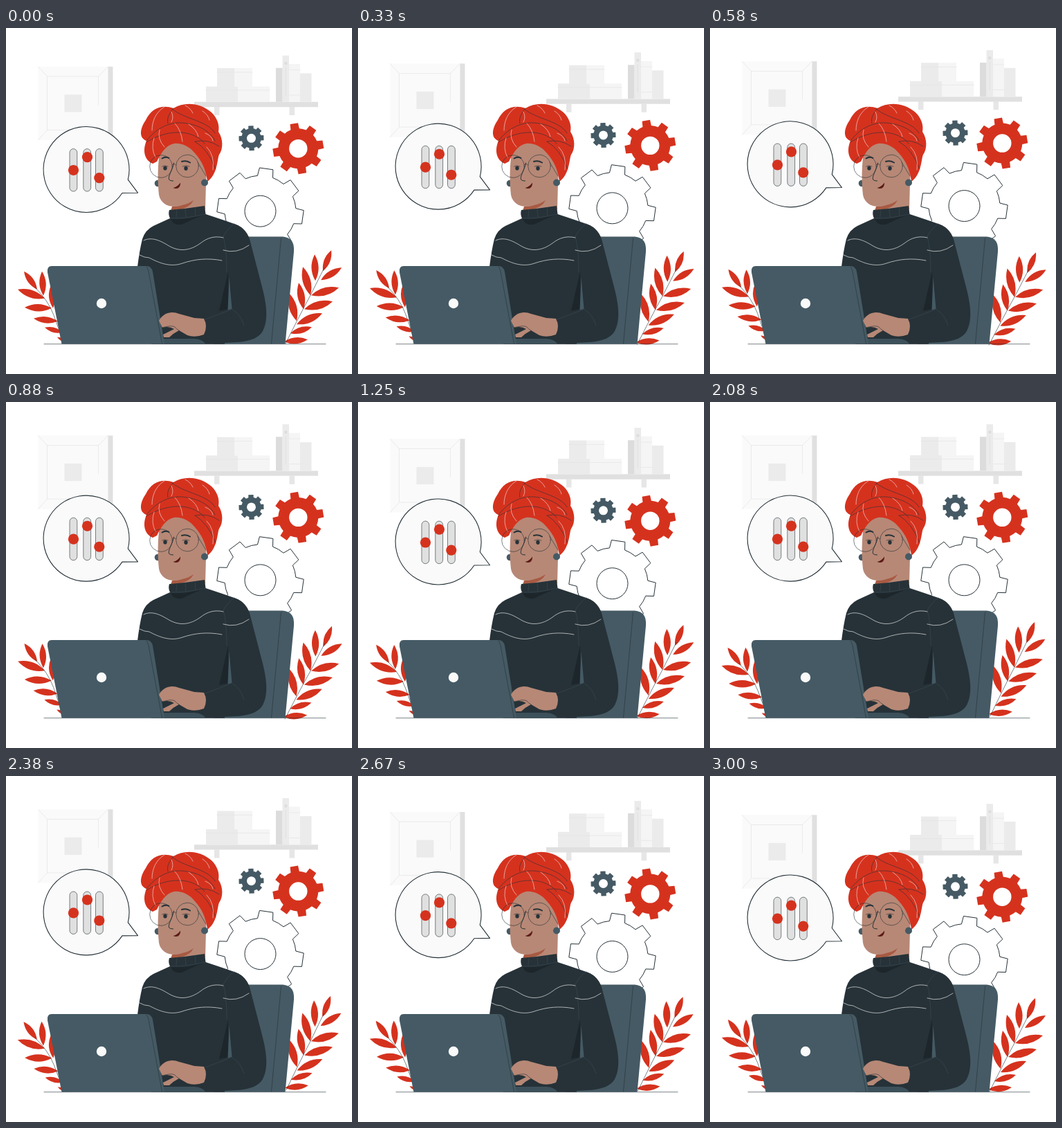
An HTML page that plays this animation: 500x500 px, repeating every 3.04 s.

```html
<!DOCTYPE html>
<html lang="en">
<head>
<meta charset="utf-8">
<title>Working with settings</title>
<style>
  html, body { margin: 0; width: 100%; height: 100%; overflow: hidden; background: #fff; }
  svg { display: block; width: 100%; height: 100%; }
  .line { fill: none; stroke-linecap: round; stroke-linejoin: round; }
  .dark { stroke: #263238; stroke-width: .6; }
  .pale { stroke: #f3e9e6; stroke-width: .6; }
  .faint { stroke: #e4e4e4; stroke-width: .7; }
</style>
</head>
<body>
<svg viewBox="0 0 500 500">
  <g id="floating">
    <!-- picture -->
    <path fill="#e0e0e0" d="M147 55.800h7.500v106.200h-7.500z"/>
    <path fill="#fafafa" d="M46.500 55.800h101v106.200h-101z"/>
    <path class="line faint" d="M46.500 55.800L59.500 70H133.500L147.500 55.800M133.500 70V111M59.500 70V147.500H133.500M59.500 147.500L46.500 162"/>
    <path fill="#ebebeb" d="M84.500 96.300h25v25.200h-25z"/>

    <!-- shelf -->
    <path fill="#e6e6e6" d="M301 114h7.500v12h-7.500zM409.500 114h7.500v12h-7.500z"/>
    <path fill="#e0e0e0" d="M272 106.800h179v7.400h-179z"/>
    <path fill="#ebebeb" d="M305 58h25v26.500h-25zM289 84.500h46v22.300h-46zM399.500 39.700h9.500v67h-9.500zM425 65.500h16.500v41.300h-16.500z"/>
    <path fill="#f5f5f5" d="M330 58h26v26.500h-26zM335 84.500h46v22.300h-46zM409 52h16v54.800h-16z"/>
    <path fill="#dcdcdc" d="M390 57.700h9.500v49h-9.500z"/>
    <path class="line faint" d="M305 64H356M289 90H381M409 60.500H425M409 97H425"/>
    <path class="line" stroke="#dcdcdc" stroke-width=".7" d="M404.300 57V97"/>
    <circle cx="404.300" cy="51" r="2.300" fill="#dedede"/>

    <g id="gears"></g>

    <!-- speech bubble -->
    <path fill="#fafafa" stroke="#263238" stroke-width="1.100" stroke-linejoin="round"
      d="M176.300 219.200L190.500 238.200L167.900 238.500A62 62 0 1 1 176.300 219.200Z"/>
    <g fill="#e0e0e0" stroke="#263238" stroke-width=".6">
      <rect x="92" y="174.600" width="10.800" height="61.500" rx="5.400"/>
      <rect x="111.800" y="174.600" width="10.800" height="61.500" rx="5.400"/>
      <rect x="129.500" y="174.600" width="10.800" height="61.500" rx="5.400"/>
    </g>
    <g fill="#d5321e">
      <circle cx="97.500" cy="205.500" r="7.600"/>
      <circle cx="117.500" cy="186.600" r="7.600"/>
      <circle cx="134.800" cy="216.600" r="7.600"/>
    </g>
  </g>

  <g id="plants">
    <g id="leaves" fill="#d5321e"></g>
    <path class="line dark" d="M404 456C416 432 428 408 440 386Q449 368 460 346M42 375Q61 394 69 415T82 454"/>
  </g>

  <path class="line dark" d="M55 456.700H462"/>

  <!-- chair -->
  <path fill="#455a64" d="M318 301.500H400Q417.500 303 416 323L403.500 456.700H300V330Z"/>
  <path class="line dark" d="M397.500 304L383.500 456"/>

  <!-- neck and face -->
  <circle cx="219.500" cy="224.500" r="4.800" fill="#455a64"/>
  <path fill="#b78876" d="M246 215L289.500 205L288 262Q262 276 238 264L246 253Z"/>
  <path fill="#a85a42" d="M240 258Q260 257 271 249Q266 259 252 262L238 264Z"/>
  <path fill="#b78876" d="M222 180C219 200 219 222 221 241C223 253 234 259 246 258C261 256 271 247 276 234L289 222L290 190L262 162H234Z"/>

  <!-- headscarf -->
  <path fill="#d5321e" d="M212 196C200 191 197 177 203 163C192 159 193 146 202 133C210 116 225 110 242 116C258 106 281 108 297 122C305 130 309 140 307 150C314 160 314 175 308 183C305 190 306 211 291 222C289 205 283 192 273 181C265 171 254 166 243 167C231 169 224 181 218 193Z"/>
  <path class="line dark" d="M203 163C216 146 234 136 254 137C278 139 295 149 302 163M240 117C258 132 292 134 302 152M203 165C224 152 246 148 265 153Q281 158 287 167M273 164Q292 160 308 171M273 164Q292 175 303 204M242 116C236 123 232 130 234 138"/>
  <path class="line pale" d="M229 114C217 121 211 134 211 148M239 121Q243 129 239 136M259 112Q267 116 270 123M284 120Q292 125 294 133M222 147Q218 160 229 172M244 138Q253 147 255 164M264 139Q276 147 278 157M214 159Q209 174 216 187M288 152Q298 156 299 163M290 172Q302 184 299 205"/>

  <!-- features -->
  <g class="line dark">
    <circle cx="224" cy="200" r="16.300"/>
    <circle cx="262" cy="199.500" r="16.300"/>
    <path d="M240 198Q243 195 246 198M277 194L289 214"/>
    <path stroke-width="1" d="M242.500 195C241 205 234 213 235.500 219Q237 221 241.500 221"/>
    <path d="M225.500 200Q229 197.500 234 200M255 200Q260 197.500 265 200"/>
  </g>
  <path class="line" stroke="#263238" stroke-width="2" d="M225.500 188.500Q231 185 235.500 188M254 193Q260 191 266 194.500"/>
  <ellipse cx="230" cy="202.500" rx="2.700" ry="3.100" fill="#263238"/>
  <ellipse cx="260" cy="202.800" rx="2.700" ry="3.100" fill="#263238"/>
  <path fill="#5b1a16" d="M241.500 231Q248 229.500 252 223.500Q252.500 228.500 248.500 231.500Q245 232.500 241.500 231Z"/>
  <circle cx="287" cy="223.500" r="5" fill="#455a64"/>

  <!-- sweater -->
  <path fill="#263238" d="M236 263Q262 261 287 257L288.500 269Q313 277 327 282Q346 287 352 305L371 378C377 402 379 423 371 438C362 453 341 454 316 455V456.700H210L190 345Q193 321 197 305Q201 292 213 286L237 275Q234 269 236 263Z"/>
  <path fill="#1c262b" d="M238 276Q262 278 288 269Q270 276 254 284Q242 286 238 276ZM321 352L308 409L322 406Z"/>
  <path fill="#455a64" d="M322.500 360L326.500 406L320.500 407.500Z"/>
  <path class="line" stroke="#3c4b52" stroke-width=".6" d="M238 275Q264 275 288 269M247 263L246 273M259 262L260 273M273 260L274 271M314 301Q319 318 319 352M314 301Q322 287 330 283M327 407Q339 413 344 430M288 421Q307 414 325 407"/>
  <path class="line" stroke="#e8e8e8" stroke-width=".7" d="M199 307C211 301 224 308 234 314C250 324 266 322 281 311C291 303 302 300 314 303M193 328Q200 332 207 332C222 340 238 346 255 340C273 334 291 332 312 336M314 321Q333 327 351 314"/>

  <!-- laptop and hand -->
  <path fill="#3d515b" d="M222 449H272Q285 450 288 456.700H222Z"/>
  <path fill="#455a64" d="M66 344H203Q210 344 212 352L229 456.700H80.500L60 353Q59 344 66 344Z"/>
  <path class="line dark" d="M203 345Q205 347 206 352L225.500 456"/>
  <circle cx="138" cy="398" r="7.200" fill="#fafafa"/>
  <path fill="#b78876" d="M221 423C228 410 241 409 250 413L272 419L286 420Q292 431 286 443Q273 448 262 444L250 437Q242 441 236 447L228 447L227 443L243 435Q235 430 226 433Z"/>
  <path class="line dark" d="M226 433Q239 429 244 432Q246 435 250 437"/>
</svg>

<script>
  const LOOP = 3040;
  const RED = '#d5321e', SLATE = '#455a64', INK = '#263238';
  const byId = id => document.getElementById(id);
  const fraction = x => x - Math.floor(x);

  // tip and foot: half angles of a tooth at its outer and inner edge
  function gearPath({ cx, cy, outer, root, hole, turn, tip = 9, foot = 12.5 }) {
    const point = (r, deg) => {
      const a = (deg + turn - 90) * Math.PI / 180;
      return `${(cx + r * Math.cos(a)).toFixed(2)} ${(cy + r * Math.sin(a)).toFixed(2)}`;
    };
    let d = '';
    for (let deg = 0; deg < 360; deg += 45) {
      d += `${deg ? `A${root} ${root} 0 0 1 ` : 'M'}${point(root, deg - foot)}`
         + `L${point(outer, deg - tip)}L${point(outer, deg + tip)}L${point(root, deg + foot)}`;
    }
    return `${d}A${root} ${root} 0 0 1 ${point(root, -foot)}Z`
         + `M${cx - hole} ${cy}a${hole} ${hole} 0 1 0 ${2 * hole} 0a${hole} ${hole} 0 1 0 ${-2 * hole} 0Z`;
  }

  const gear = (shape, paint) =>
    `<path d="${gearPath(shape)}" fill-rule="evenodd" stroke-linejoin="round" ${paint}/>`;

  byId('gears').innerHTML =
    gear({ cx: 354.5, cy: 159.3, outer: 18.3, root: 14.3, hole: 6.5, turn: -2, tip: 11.5, foot: 15 },
      `fill="${SLATE}"`) +
    gear({ cx: 422.3, cy: 174.2, outer: 37, root: 29, hole: 13.2, turn: -9.5 },
      `fill="${RED}"`) +
    gear({ cx: 367.5, cy: 264.7, outer: 62.7, root: 51.5, hole: 22.5, turn: 8 },
      `fill="#fff" stroke="${INK}"`);

  // Each leaf: base x, base y, tip x, tip y
  const leaves = [
    [458, 351, 470, 321], [455, 364, 485, 346], [441, 386, 481, 375], [431, 406, 472, 395],
    [420, 428, 457, 412], [411, 441, 442, 432], [402, 453, 436, 450], [447, 365, 446, 327],
    [440, 386, 429, 345], [430, 406, 423, 368], [420, 423, 409, 383],
    [45, 378, 26, 352], [56, 391, 17, 378], [66, 405, 27, 404], [75, 424, 40, 420],
    [82, 440, 56, 433], [54, 387, 52, 352], [68, 405, 65, 372], [88, 454, 74, 447]
  ];

  function leafPath([x, y, tipX, tipY]) {
    const dx = tipX - x, dy = tipY - y;
    const side = s => `${x + dx * .5 - dy * s} ${y + dy * .5 + dx * s}`;
    return `M${x} ${y}Q${side(.27)} ${tipX} ${tipY}Q${side(-.27)} ${x} ${y}Z`;
  }

  byId('leaves').innerHTML = `<path d="${leaves.map(leafPath).join('')}"/>`;

  function draw(time) {
    const phase = fraction((time + 40) / LOOP);
    const lift = 10 * (1 - Math.abs(2 * fraction(phase * 2) - 1));
    const sway = 1 - Math.abs(4 * fraction(phase + .25) - 2);
    byId('floating').setAttribute('transform', `translate(0 ${(.53 - lift).toFixed(3)})`);
    byId('plants').setAttribute('transform', `rotate(${sway.toFixed(4)} 251 390)`);
  }

  const start = performance.now();
  function tick() {
    draw(performance.now() - start);
    requestAnimationFrame(tick);
  }
  tick();
</script>
</body>
</html>
```
